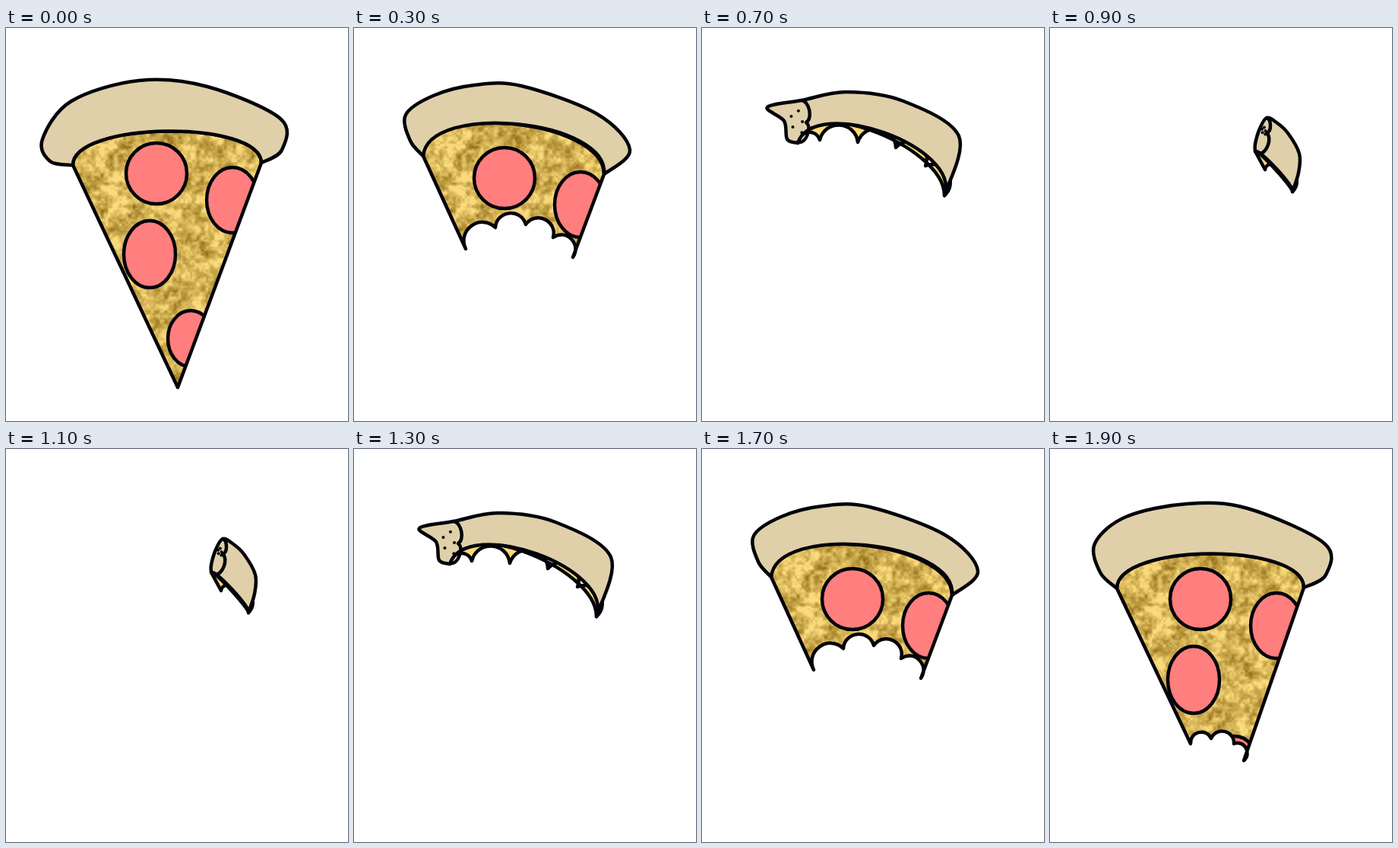
These frames come from a looping animation (450x516 px, 2 s). An HTML page with a canvas:

```html
<!DOCTYPE html>
<html lang="en">
<head>
<meta charset="utf-8">
<title>Pizza slice</title>
<style>
  html, body { margin: 0; width: 100%; height: 100%; overflow: hidden; background: #fff; }
  canvas { display: block; }
</style>
</head>
<body>
<canvas id="stage" width="450" height="516"></canvas>
<script>
const canvas = document.getElementById('stage');
const ctx = canvas.getContext('2d');
const W = canvas.width, H = canvas.height;
const STEP = 100, SAG = 6;
const INK = '#02030a', CRUST = '#dfd0a9', MEAT = '#ff7e7e', CRUMB = '#fbd876';

const points = text => text.split(' ').map(pair => pair.split(',').map(Number));
const mix = (a, b, t) => a + (b - a) * t;
const mixPoint = (p, q, t) => [mix(p[0], q[0], t), mix(p[1], q[1], t)];

// outer: crust from its left foot over the top to its right foot; rise: height of its underside;
// bite: cusps between tooth marks, left to right; cut: bitten end of the crust.
function pose(outer, rise, bite, cut) {
  return { outer: points(outer), rise, bite: points(bite), cut: cut && points(cut) };
}

const whole = pose('88,180 58,175 48,146 86,96 175,69 265,77 361,119 363,160 336,177', 43, '226,472');
const tipless = pose('88,183 66,162 59,124 100,89 180,72 260,78 361,124 363,165 334,182', 45,
  '185,387 212,380 242,387 255,409');
const half = pose('91,168 74,148 68,114 104,89 158,75 220,76 320,113 363,160 329,192', 54,
  '147,290 186,262 226,258 262,275 288,301');
const strip = pose('88,158 72,145 70,120 112,97 165,89 235,86 310,106 352,158 326,199', 51,
  '98,191 143,187 176,190 208,192 261,196 291,214 313,236');
const rind = pose('126,151 112,146 108,122 86,104 131,95 190,84 265,96 338,142 319,220', 51,
  '126,151 155,147 205,150 255,157 294,181 319,220', '131,95 137,124 128,150');
const stub = pose('270,162 270,152 276,132 285,118 298,124 313,138 328,165 327,190 319,215', 5,
  '283,186 299,185 319,215', '285,118 285,138 275,165');

const poses = [whole, tipless, between(tipless, half), half, between(half, strip), strip,
  between(strip, rind), rind, between(rind, stub), stub, null];

const meats = [[198, 191, 40, 40], [298, 226, 34, 43], [189, 297, 34, 44], [243, 408, 30, 37]];

function between(a, b, t = 0.4) {
  const mixList = (from, to) => {
    const count = Math.max(from.length, to.length);
    const at = (list, i) => {
      const k = i / (count - 1) * (list.length - 1), low = Math.floor(k);
      return mixPoint(list[low], list[Math.min(low + 1, list.length - 1)], k - low);
    };
    return Array.from({ length: count }, (_, i) => mixPoint(at(from, i), at(to, i), t));
  };
  return {
    outer: mixList(a.outer, b.outer),
    rise: mix(a.rise, b.rise, t),
    bite: mixList(a.bite, b.bite),
    cut: a.cut && b.cut && mixList(a.cut, b.cut)
  };
}

function spline(path, list) {
  for (let i = 0; i + 1 < list.length; i++) {
    const a = list[i], b = list[i + 1];
    const before = list[i - 1] || a, after = list[i + 2] || b;
    path.bezierCurveTo(
      a[0] + (b[0] - before[0]) / 6, a[1] + (b[1] - before[1]) / 6,
      b[0] - (after[0] - a[0]) / 6, b[1] - (after[1] - a[1]) / 6, ...b);
  }
}

// Arch from a to b bulging to the left of the direction of travel.
function arch(path, a, b, height, lean = 0) {
  const dx = b[0] - a[0], dy = b[1] - a[1];
  const lift = height * 4 / 3 / Math.hypot(dx, dy);
  path.bezierCurveTo(
    a[0] + dx * lean + dy * lift, a[1] + dy * lean - dx * lift,
    b[0] - dx * lean + dy * lift, b[1] - dy * lean - dx * lift, ...b);
}

function scallops(path, cusps, bulge) {
  for (let i = 1; i < cusps.length; i++) {
    const a = cusps[i - 1], b = cusps[i];
    arch(path, a, b, bulge * Math.hypot(b[0] - a[0], b[1] - a[1]), 0.1);
  }
}

function hash(x, y, seed) {
  let n = Math.imul(x, 374761393) ^ Math.imul(y, 668265263) ^ Math.imul(seed, 974634777);
  n = Math.imul(n ^ (n >>> 13), 1274126177);
  return ((n ^ (n >>> 16)) >>> 0) / 2 ** 32;
}

function valueNoise(x, y, size) {
  x /= size; y /= size;
  const ix = Math.floor(x), iy = Math.floor(y);
  const ease = t => t * t * (3 - 2 * t);
  const u = ease(x - ix), v = ease(y - iy);
  return mix(mix(hash(ix, iy, size), hash(ix + 1, iy, size), u),
    mix(hash(ix, iy + 1, size), hash(ix + 1, iy + 1, size), u), v);
}

// Mottled gold made of three layers of noise.
function cheeseTexture() {
  const tile = document.createElement('canvas');
  tile.width = W; tile.height = H;
  const g = tile.getContext('2d');
  const image = g.createImageData(W, H);
  const dark = [140, 104, 18], light = [250, 218, 122];
  for (let y = 0, k = 0; y < H; y++) {
    for (let x = 0; x < W; x++, k += 4) {
      const n = valueNoise(x, y, 14) * 0.35 + valueNoise(x, y, 6) * 0.4 + valueNoise(x, y, 3) * 0.25;
      const t = Math.min(1, Math.max(0, (n - 0.5) * 1.5 + 0.66));
      for (let c = 0; c < 3; c++) image.data[k + c] = mix(dark[c], light[c], t);
      image.data[k + 3] = 255;
    }
  }
  g.putImageData(image, 0, 0);
  return ctx.createPattern(tile, 'no-repeat');
}

const cheeseFill = cheeseTexture();

function paint(path, fill) {
  if (fill) {
    ctx.fillStyle = fill;
    ctx.fill(path);
  }
  ctx.stroke(path);
}

function drawCheese({ outer, rise, bite, cut }, sag) {
  const left = outer[0], right = outer[outer.length - 1];
  const cheese = new Path2D();
  cheese.moveTo(...left);
  cheese.lineTo(...bite[0]);
  scallops(cheese, bite, 0.42);
  cheese.lineTo(...right);
  // The top edge follows the underside of the crust.
  cheese.bezierCurveTo(right[0], right[1] - rise * 4 / 3, left[0], left[1] - rise * 4 / 3, ...left);

  ctx.save();
  ctx.clip(cheese);
  ctx.fillStyle = cut ? CRUMB : cheeseFill;
  ctx.fillRect(0, 0, W, H);
  if (!cut) {
    for (const [x, y, rx, ry] of meats) {
      const slice = new Path2D();
      slice.ellipse(x, y + sag, rx, ry, 0, 0, 2 * Math.PI);
      paint(slice, MEAT);
    }
  }
  ctx.restore();
  paint(cheese);
}

function drawCrust({ outer, rise }) {
  const left = outer[0], right = outer[outer.length - 1];
  const crust = new Path2D();
  crust.moveTo(...left);
  spline(crust, outer);
  // Travelling right to left, so the bulge is negative to point up.
  arch(crust, right, left, -rise);
  crust.closePath();
  paint(crust, CRUST);
}

function drawBittenEnd({ outer, cut }) {
  const edge = new Path2D();
  edge.moveTo(...cut[0]);
  scallops(edge, cut, 0.25);
  paint(edge);

  const center = mixPoint(outer[2], cut[1], 0.5);
  const spread = (cut[1][0] - outer[2][0]) * 0.7;
  ctx.fillStyle = INK;
  for (let i = 0; i < 5; i++) {
    ctx.beginPath();
    ctx.arc(center[0] + (hash(i, 1, 5) - 0.5) * spread,
      center[1] + (i / 4 - 0.5) * spread * 1.4, 2, 0, 2 * Math.PI);
    ctx.fill();
  }
}

function draw(slice, sag) {
  ctx.fillStyle = '#fff';
  ctx.fillRect(0, 0, W, H);
  if (!slice) return;
  ctx.strokeStyle = INK;
  ctx.lineWidth = 4.5;
  ctx.lineJoin = ctx.lineCap = 'round';
  drawCheese(slice, sag);
  drawCrust(slice);
  if (slice.cut) drawBittenEnd(slice);
}

// The slice is eaten pose by pose, then grows back the same way.
function tick() {
  const last = poses.length - 1;
  const step = Math.floor(performance.now() / STEP) % (2 * last);
  draw(poses[last - Math.abs(last - step)], step ? SAG : 0);
  requestAnimationFrame(tick);
}
tick();
</script>
</body>
</html>
```
